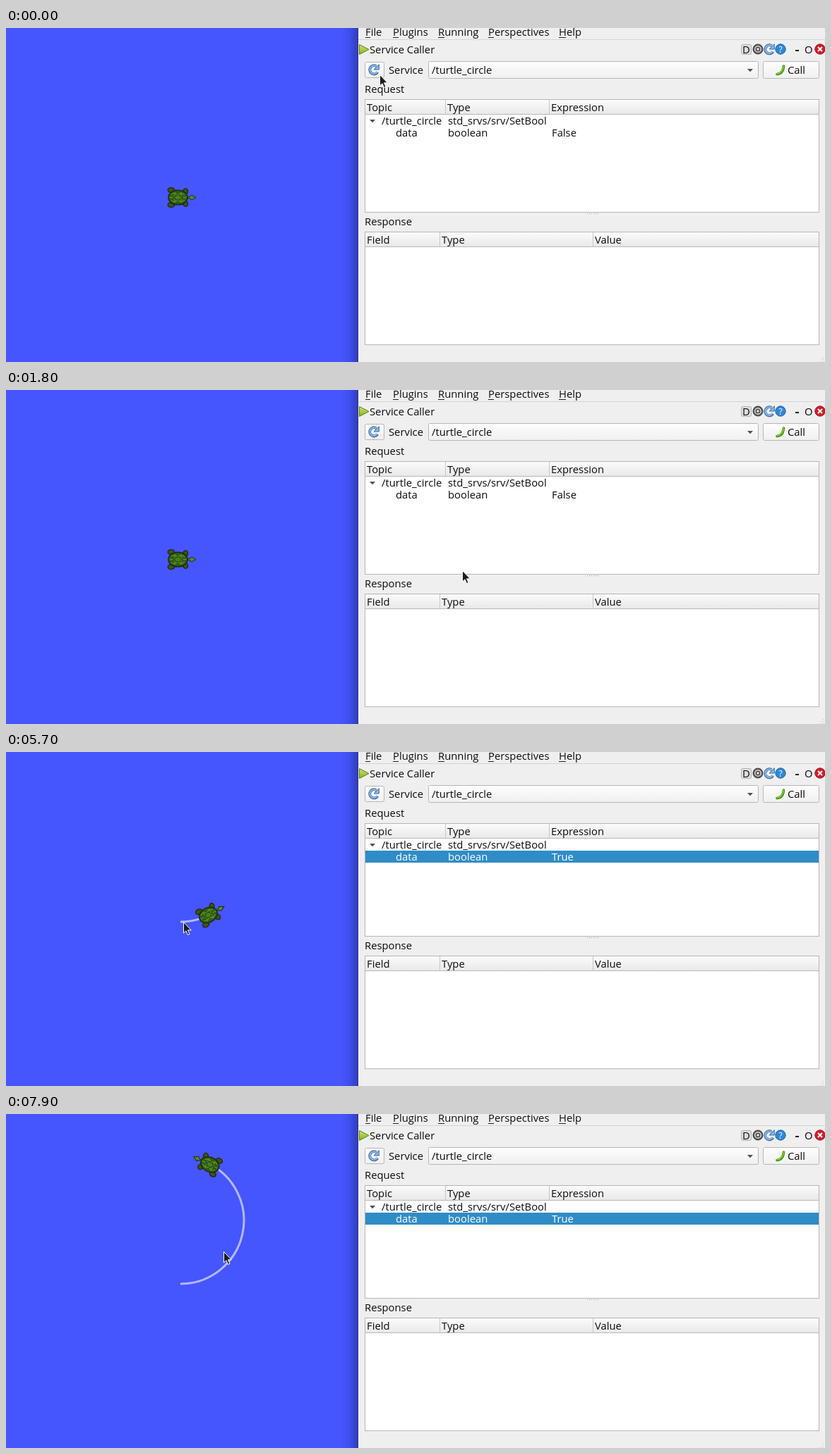
Animation of 1160 by 474 pixels, one loop 8 s. Source, as an HTML page:

```html
<!DOCTYPE html>
<html lang="en">
<head>
<meta charset="utf-8">
<title>Service Caller</title>
<style>
  html, body { margin: 0; width: 100%; height: 100%; overflow: hidden; background: #4556ff; }
  svg { display: block; width: 1160px; height: 474px; }
  text { font: 14.8px "Open Sans", "Noto Sans", sans-serif; white-space: pre; }
</style>
</head>
<body>
<svg id="stage" viewBox="0 0 1160 474" xmlns="http://www.w3.org/2000/svg">
  <defs>
    <linearGradient id="shade">
      <stop offset="0" stop-color="#101860" stop-opacity="0"/>
      <stop offset=".5" stop-color="#101860" stop-opacity=".12"/>
      <stop offset="1" stop-color="#101860" stop-opacity=".42"/>
    </linearGradient>
    <linearGradient id="button" x2="0" y2="1">
      <stop offset="0" stop-color="#fdfdfd"/>
      <stop offset="1" stop-color="#f0f0f0"/>
    </linearGradient>
    <linearGradient id="header" x2="0" y2="1">
      <stop offset="0" stop-color="#fbfbfb"/>
      <stop offset="1" stop-color="#e9e9e9"/>
    </linearGradient>
    <linearGradient id="play" x2="0" y2="1">
      <stop offset="0" stop-color="#d3e27a"/>
      <stop offset="1" stop-color="#82b414"/>
    </linearGradient>
    <g id="reload" fill="none" stroke-linejoin="round">
      <path d="M5.3 3.6A6 6 0 1 1 3.4 -4.8" stroke="#3b6ea8" stroke-width="4"/>
      <path d="M7.3 -7.3V0H0Z" fill="#8db6e2" stroke="#3b6ea8"/>
      <path d="M4.9 3.2A5.7 5.7 0 1 1 3.6 -4.4" stroke="#8db6e2" stroke-width="2.2"/>
    </g>
  </defs>
  <g id="sea">
    <rect width="500" height="474" fill="#4556ff"/>
    <path id="trail" fill="none" stroke="#b3b8ff" stroke-width="3"/>
    <g id="turtle" stroke="#1b2c08">
      <g fill="#4a4d1c" stroke-width="1.4">
        <ellipse cx="-13" cy="-11" rx="4.7" ry="3.4"/>
        <ellipse cx="-13" cy="10" rx="4.7" ry="3.4"/>
        <ellipse cx="7" cy="-9" rx="3.4" ry="4.2" transform="rotate(20 7 -9)"/>
        <ellipse cx="7" cy="8" rx="3.4" ry="4.2" transform="rotate(-20 7 8)"/>
      </g>
      <path d="M10 -1L14 -2 16 -4 19 -2 22 -.5 19 1 16 3 14 1 10 0Z" fill="#5c8b25"/>
      <ellipse cx="-3.5" cy="-.5" rx="13.5" ry="10.3" fill="#2f5d12" stroke-width="1.5"/>
      <path d="M-13 -5L-8 -7 -4 -4 1 -7 6 -4M-13 4L-8 6 -4 3 1 6 6 3M-8 -7V6M1 -7V6M-15 -.5H-11M4 -.5H9"
        fill="none" stroke="#5c942a" stroke-width="1.3"/>
      <ellipse cx="-3.5" cy="-.5" rx="4.5" ry="3.5" fill="#47801c" stroke-width=".8"/>
    </g>
    <rect x="474" width="25" height="474" fill="url(#shade)"/>
  </g>
  <g id="panel"></g>
  <g id="popup"></g>
  <path id="cursor" d="M.5 .5V16L4 12.8 6.5 18.5 9 17.4 6.5 11.8H11.3Z" fill="#1d1d1d" stroke="#fff"/>
</svg>
<script>
const LOOP = 8000, STEP = 100;
const BLUE = "#308cc6", GREY = "#efefef", LINE = "#b6b6b6";
const get = id => document.getElementById(id);
const panel = get("panel"), popup = get("popup");

function add(parent, tag, attrs, content) {
  const node = document.createElementNS("http://www.w3.org/2000/svg", tag);
  for (const key in attrs) node.setAttribute(key, attrs[key]);
  if (content !== undefined) node.textContent = content;
  parent.appendChild(node);
  return node;
}
const rect = (x, y, width, height, fill, extra, parent = panel) =>
  add(parent, "rect", { x, y, width, height, fill, ...extra });
const text = (x, y, content, extra, parent = panel) =>
  add(parent, "text", { x, y, fill: "#0c0c0c", ...extra }, content);
const path = (d, extra) => add(panel, "path", { d, fill: "none", ...extra });
const button = (x, y, w, h) =>
  rect(x + .5, y + .5, w - 1, h - 1, "url(#button)", { stroke: LINE, rx: 2 });
const show = (node, on) => node.setAttribute("visibility", on ? "visible" : "hidden");
const fill = (node, color) => node.setAttribute("fill", color);

function table(y, height, columns) {
  rect(508.5, y + .5, 643, height - 1, "#fff", { stroke: LINE });
  rect(509, y + 1, 642, 20, "url(#header)");
  rect(509, y + 21, 642, 1, "#b9b9b9");
  columns.forEach(([x, label], i) => {
    if (i) rect(x - 3, y + 1, 1, 20, "#c6c6c6");
    text(x, y + 17, label);
  });
}

// Menu and title
rect(498, 0, 662, 474, GREY);
rect(498, 0, 1, 474, "#32386e");
[[509, "File", 7], [548, "Plugins", 8], [612, "Running", 9], [683, "Perspectives", 8], [783, "Help", 10]]
  .forEach(([x, label, w]) => {
    text(x, 11, label);
    rect(x, 13, w, 1, "#222");
  });
rect(499, 16, 661, 1, "#d4d4d4");
path("M500.5 23.5L514 30.5 500.5 37.5Z", { fill: "url(#play)", stroke: "#5a7d12" });
text(515, 36, "Service Caller");
rect(1041.5, 23.5, 14, 14, "#dedede", { stroke: "#b2b2b2", rx: 2 });
text(1043, 36, "D");
add(panel, "circle", { cx: 1065, cy: 30, r: 6.3, fill: "#d8d8d8", stroke: "#505050", "stroke-width": 2.4 });
add(panel, "circle", { cx: 1065, cy: 30, r: 2.6, fill: "#eee", stroke: "#505050", "stroke-width": 1.8 });
add(panel, "use", { href: "#reload", x: 1081, y: 30 });
add(panel, "circle", { cx: 1097, cy: 30, r: 7.2, fill: "#3187d2", stroke: "#1b65a6" });
text(1097, 34.5, "?", { fill: "#fff", "text-anchor": "middle", style: "font-size:12px" });
rect(1118, 31, 5, 2, "#111");
text(1131, 36, "O");
add(panel, "circle", { cx: 1153, cy: 30, r: 7.2, fill: "#cc1f2b", stroke: "#a3121d" });
path("M1150 27L1156 33M1156 27L1150 33", { stroke: "#fff", "stroke-width": 2 });

// Service row
button(508, 48, 28, 23);
const reload = add(panel, "use", { href: "#reload", x: 521, y: 59 });
text(542, 65, "Service");
button(598, 47, 468, 25);
text(603, 65, "/turtle_circle");
path("M1050 58H1058L1054 62.2Z", { fill: "#505050" });
const call = button(1072, 47, 80, 25);
path("M1092 65.5C1098 65 1101 60 1101.5 54", { stroke: "#4a9017", "stroke-width": 3.6, "stroke-linecap": "round" });
path("M1092 65C1098 64 1100.5 60 1101.5 54", { stroke: "#83cb3c", "stroke-width": 1.6, "stroke-linecap": "round" });
text(1107, 65, "Call");

// Tables
text(508, 92, "Request");
table(101, 161, [[511, "Topic"], [625, "Type"], [772, "Expression"]]);
path("M515 130H523L519 134.2Z", { fill: "#505050" });
text(532, 137, "/turtle_circle");
text(626, 137, "std_srvs/srv/SetBool");
const row = rect(509, 140, 642, 17, BLUE);
const editor = rect(770, 140, 381, 17, "#fff");
const selection = rect(772, 140, 34, 17, BLUE);
const rowLabels = [text(552, 154, "data"), text(626, 154, "boolean")];
const value = text(773, 154, "False");
const caret = rect(806, 140, 1, 17, "#cf7339");
for (let x = 823; x < 840; x += 3) rect(x, 263, 1, 1, "#a0a0a0");
text(508, 280, "Response");
table(289, 161, [[511, "Field"], [617, "Type"], [834, "Value"]]);
[[1157, 467], [1157, 470], [1154, 470], [1157, 473], [1154, 473], [1151, 473]]
  .forEach(([x, y]) => rect(x, y, 1, 1, "#c4c4c4"));

// Service list
const six = ["describe_parameters", "get_parameter_types", "get_parameters",
  "list_parameters", "set_parameters", "set_parameters_atomically"];
const services = [
  ...six.map(s => "/spawn_turtle_node/" + s),
  ...["rotate_absolute/_action/cancel_goal", "set_pen", "teleport_absolute", "teleport_relative"]
    .map(s => "/turtle1/" + s),
  "/turtle_circle",
  ...six.map(s => "/turtle_circle_server/" + s),
  ...six.slice(0, 2).map(s => "/turtlesim/" + s)
];
rect(598.5, -2, 467, 480, GREY, { stroke: "#8c8c8c" }, popup);
const hover = rect(598.5, 47.5, 466, 24, BLUE, { stroke: "#2670a0" }, popup);
const items = services.map((s, i) => text(606, 15 + 25 * i, s, {}, popup));

// Pointer stops: time, x, y
const stops = [
  [0, 529, 66], [400, 545, 72], [500, 545, 72], [800, 632, 59], [1000, 632, 59],
  [1300, 637, 140], [1600, 646, 256], [1800, 646, 256], [2200, 735, 190], [2500, 789, 148],
  [2700, 789, 148], [2900, 873, 137], [4600, 873, 137], [4800, 1098, 57], [5200, 1098, 57],
  [5400, 620, 185], [5600, 214, 266], [5700, 251, 241], [5800, 250, 250], [6000, 251, 246],
  [6600, 309, 197], [7600, 309, 197], [7700, 308, 195], [LOOP, 308, 195]
];
function pointerAt(t) {
  const i = stops.findIndex(s => s[0] > t);
  const [t0, x0, y0] = stops[i - 1], [t1, x1, y1] = stops[i];
  const k = (t - t0) / (t1 - t0);
  return [Math.round(x0 + (x1 - x0) * k), Math.round(y0 + (y1 - y0) * k)];
}

const typing = [[3300, "T"], [3500, "Tr"], [3700, "Tru"], [3900, "True"]];
const typedAt = t => typing.reduce((s, [at, v]) => t >= at ? v : s, "False");

function drawTurtle(t) {
  const a = Math.max(0, t - 5205) / 1000, r = 90;
  const x = 247 + r * Math.sin(a), y = 151 + r * Math.cos(a);
  get("trail").setAttribute("d", a ? `M247 241A${r} ${r} 0 0 0 ${x} ${y}` : "");
  get("turtle").setAttribute("transform", `translate(${x} ${y}) rotate(${-a * 180 / Math.PI})`);
}

function drawRow(t) {
  const selected = t >= 2500, editing = t >= 2600 && t < 4100;
  const word = typedAt(t), fresh = word === "False";
  show(row, selected);
  show(editor, editing);
  show(selection, editing && fresh);
  show(caret, editing);
  rowLabels.forEach(label => fill(label, selected ? "#fff" : "#0c0c0c"));
  fill(value, selected && (!editing || fresh) ? "#fff" : "#0c0c0c");
  value.textContent = word;
  const end = Math.round(773 + value.getComputedTextLength());
  selection.setAttribute("width", end - 772);
  caret.setAttribute("x", end);
}

function draw(time) {
  const t = Math.floor(time % LOOP / STEP) * STEP;
  const [x, y] = pointerAt(t);
  get("cursor").setAttribute("transform", `translate(${x} ${y})`);

  show(popup, t >= 800 && t < 1800);
  const current = Math.floor((y + 3) / 25);
  hover.setAttribute("y", current * 25 - 2.5);
  items.forEach((item, i) => fill(item, i === current ? "#fff" : "#0c0c0c"));

  reload.setAttribute("x", t === 200 ? 522 : 521);
  fill(call, t === 5000 || t === 5100 ? "#dcdcdc" : "url(#button)");
  drawRow(t);
  drawTurtle(t);
}

const start = performance.now();
function tick() {
  draw(performance.now() - start);
  requestAnimationFrame(tick);
}
tick();
</script>
</body>
</html>
```
